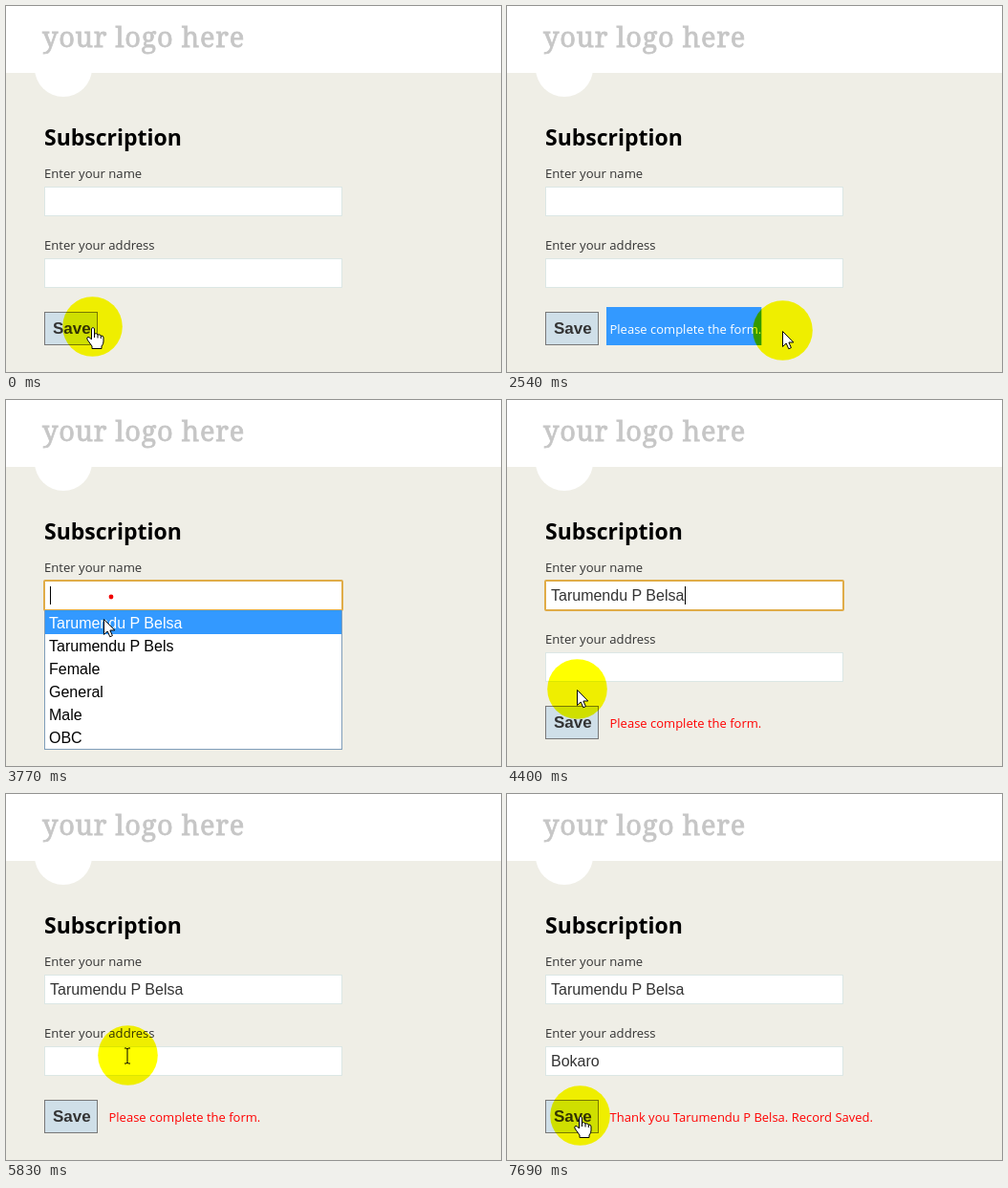
An HTML page that plays this animation: 518 px wide and 383 px high, repeating every 7990 ms.

```html
<!DOCTYPE html>
<html lang="en">
<head>
<meta charset="utf-8">
<title>Subscription form</title>
<style>
html, body { margin: 0; width: 100%; height: 100%; overflow: hidden; background: #efeee6; }
svg { display: block; width: 518px; height: 383px; }
text { white-space: pre; }
.logo { font: 29px "Noto Serif", serif; letter-spacing: .75px; fill: #c6c6c6; stroke: #c6c6c6; stroke-width: .8px; }
.title { font: 700 23px "Open Sans", sans-serif; }
.label { font: 13.1px "Open Sans", sans-serif; fill: #333; }
.msg { font: 13px "Open Sans", sans-serif; fill: #f00; }
.field { font: 16px "Liberation Sans", Arial, sans-serif; fill: #333; }
.item { font: 16px "Liberation Sans", Arial, sans-serif; }
.save { font: 700 17px "Liberation Sans", Arial, sans-serif; fill: #333; }
#halo { mix-blend-mode: multiply; }
</style>
</head>
<body>
<svg viewBox="0 0 518 383" xmlns="http://www.w3.org/2000/svg">
  <rect width="518" height="383" fill="#efeee6"/>
  <rect width="518" height="70" fill="#fff"/>
  <circle cx="60" cy="65" r="30" fill="#fff"/>
  <text class="logo" x="38" y="43">your logo here</text>
  <text class="title" x="40" y="146">Subscription</text>
  <text class="label" x="40" y="180">Enter your name</text>
  <text class="label" x="40" y="255">Enter your address</text>
  <g id="fields"></g>
  <rect x="40.5" y="320.5" width="55" height="34" fill="#cfdfe8" stroke="#787878"/>
  <text class="save" x="49" y="343">Save</text>
  <text class="msg" id="msg" x="107.5" y="343"></text>
  <clipPath id="picked"><rect id="pick" x="104" y="315" height="40"/></clipPath>
  <g id="selection" clip-path="url(#picked)">
    <rect x="104" y="315" width="200" height="40" fill="#39f"/>
    <text class="msg" x="107.5" y="343" style="fill:#fff">Please complete the form.</text>
  </g>
  <g id="lists"></g>
  <circle id="halo" cx=".5" cy="-.5" r="31.3" fill="#ff0"/>
  <circle id="dot" r="2.4" fill="#f00000"/>
  <g id="cursor" stroke="#000" fill="#fff" stroke-linejoin="round">
    <path id="arrow" d="M.5 .5V16.5L4.2 13 6.8 18.8 9.4 17.6 6.9 12H11.8Z"/>
    <g id="hand" transform="translate(1 0)">
      <path d="M-1.5 1.5Q0-.5 1.5 1.5V7q2.5-1 3.5 1q2.3-.8 3.3 1q2.7-.3 2.7 2V15q0 3-2 5v2.5H-1V20L-6 13q-.8-2.4 1-2.6q1.5 0 3.5 2.6z"/>
      <path d="M1.5 6.5V11M5 8V11.5M8.3 9V12" fill="none"/>
    </g>
    <path id="beam" d="M-3-8H-1L0-7 1-8H3M0-7V7M-3 8H-1L0 7 1 8H3" fill="none"/>
  </g>
</svg>
<script>
const LOOP = 7990;
const CLICK_GLOW = 310;   // how long a click dot replaces the halo
const PICK_DELAY = 120;   // from pressing a list item to its value
const $ = id => document.getElementById(id);
const show = (el, on) => { el.style.display = on ? '' : 'none'; };
const within = (v, a, b) => v >= a && v < b;
const smooth = k => k * k * (3 - 2 * k);

function add(parent, tag, attrs, text) {
  const el = document.createElementNS('http://www.w3.org/2000/svg', tag);
  for (const k in attrs) el.setAttribute(k, attrs[k]);
  if (text) el.textContent = text;
  parent.appendChild(el);
  return el;
}

const person = 'Tarumendu P Belsa';
const saves = [670, 4960, 7190];
const inputs = [
  { y: 189, focus: 3330, open: 3560, press: 3960, blur: saves[1],
    items: [person, person.slice(0, -1), 'Female', 'General', 'Male', 'OBC'] },
  { y: 264, focus: 6050, open: 6210, press: 6600, blur: saves[2],
    items: ['Bokaro', 'Delhi', 'Gaya', 'Mumbai', 'Patna', 'Ranchi'] }
];
const clicks = saves.concat(...inputs.map(f => [f.focus, f.open, f.press])).sort((a, b) => a - b);

// Pointer moves; it rests in between
const home = { x: 90, y: 336 };
const moves = [
  { from: 30, to: 510, x: 76, y: 332 },
  { from: 1000, to: 1300, x: 104, y: 336 },
  { from: 1500, to: 2540, x: 288, y: 340 },
  { from: 2540, to: 2680, x: 311, y: 339 },
  { from: 2680, to: 3200, x: 110, y: 206 },
  { from: 3680, to: 3770, x: 102, y: 229 },
  { from: 4100, to: 4610, x: 57, y: 345 },
  { from: 4810, to: 4960, x: 63, y: 338 },
  { from: 5260, to: 5700, x: 122, y: 253 },
  { from: 5700, to: 5890, x: 128, y: 280 },
  { from: 6210, to: 6500, x: 96, y: 307 },
  { from: 6760, to: 7150, x: 76, y: 337 }
];

function pointer(t) {
  let { x, y } = home;
  for (const m of moves) {
    if (t < m.from) break;
    const k = smooth(Math.min(1, (t - m.from) / (m.to - m.from)));
    x += (m.x - x) * k;
    y += (m.y - y) * k;
  }
  return [Math.round(x), Math.round(y)];
}

for (const f of inputs) {
  const g = $('fields');
  f.pick = f.press + PICK_DELAY;
  add(g, 'rect', { x: 40.5, y: f.y + .5, width: 311, height: 30, fill: '#fff', stroke: '#dbe7e5' });
  f.ring = add(g, 'rect', { x: 40, y: f.y, width: 312, height: 31, rx: 1, fill: 'none', stroke: '#e0ac48', 'stroke-width': 2 });
  f.text = add(g, 'text', { class: 'field', x: 46, y: f.y + 21 }, f.items[0]);
  f.caret = add(g, 'rect', { y: f.y + 6, width: 1, height: 19 });
  f.list = add($('lists'), 'g', {});
  add(f.list, 'rect', { x: 40.5, y: f.y + 31.5, width: 311, height: 145, fill: '#fff', stroke: '#7f9db9' });
  f.bar = add(f.list, 'rect', { x: 41, y: f.y + 31, width: 310, height: 25, fill: '#39f' });
  f.rows = f.items.map((s, i) =>
    add(f.list, 'text', { class: 'item', x: 45, y: f.y + 50 + 24 * i }, s));
}

function drawField(f, t, y) {
  const focused = within(t, f.focus, f.blur), filled = t >= f.pick;
  const hot = y >= f.y + 31;
  show(f.ring, focused);
  show(f.text, filled);
  show(f.list, within(t, f.open, f.pick));
  show(f.bar, hot);
  f.rows[0].setAttribute('fill', hot ? '#fff' : '#000');
  const since = t - (filled ? f.pick : f.focus);
  show(f.caret, focused && since % 1000 < 500);
  f.caret.setAttribute('x', filled ? 47 + Math.round(f.text.getComputedTextLength()) : 46);
}

function drawMessage(t, x) {
  const msg = $('msg');
  const s = t < 1000 ? '' : t < 7280 ? 'Please complete the form.' : `Thank you ${person}. Record Saved.`;
  if (msg.textContent !== s) msg.textContent = s;
  const on = within(t, 1560, inputs[0].focus);
  show($('selection'), on);
  if (!on) return;
  const reach = t > 2540 ? 288 : x;
  let end = 104;
  for (let n = 1; n <= s.length; n++) {
    const edge = 107.5 + msg.getSubStringLength(0, n);
    if (edge <= reach + 3) end = edge;
  }
  $('pick').setAttribute('width', end - 104);
}

function drawPointer(t, x, y) {
  const move = (id, px, py) => $(id).setAttribute('transform', `translate(${px} ${py})`);
  const click = clicks.filter(c => within(t, c, c + CLICK_GLOW)).pop();
  show($('halo'), !click);
  show($('dot'), click);
  move('halo', x, y);
  if (click) move('dot', ...pointer(click));

  const covered = inputs.some(f => within(t, f.open, f.pick) && y >= f.y + 31);
  const overSave = !covered && within(x, 40, 97) && within(y, 320, 355);
  const overField = within(x, 41, 352) && inputs.some(f => within(y, f.y, f.y + 31));
  const overText = t >= 1000 && within(x, 108, 266) && within(y, 328, 350);
  const beam = !covered && (overField || overText);
  show($('hand'), overSave);
  show($('beam'), beam);
  show($('arrow'), !overSave && !beam);
  move('cursor', x, y);
}

function draw(t) {
  const [x, y] = pointer(t);
  for (const f of inputs) drawField(f, t, y);
  drawMessage(t, x);
  drawPointer(t, x, y);
}

const start = performance.now();
function tick() {
  draw((performance.now() - start) % LOOP);
  requestAnimationFrame(tick);
}
tick();
</script>
</body>
</html>
```
